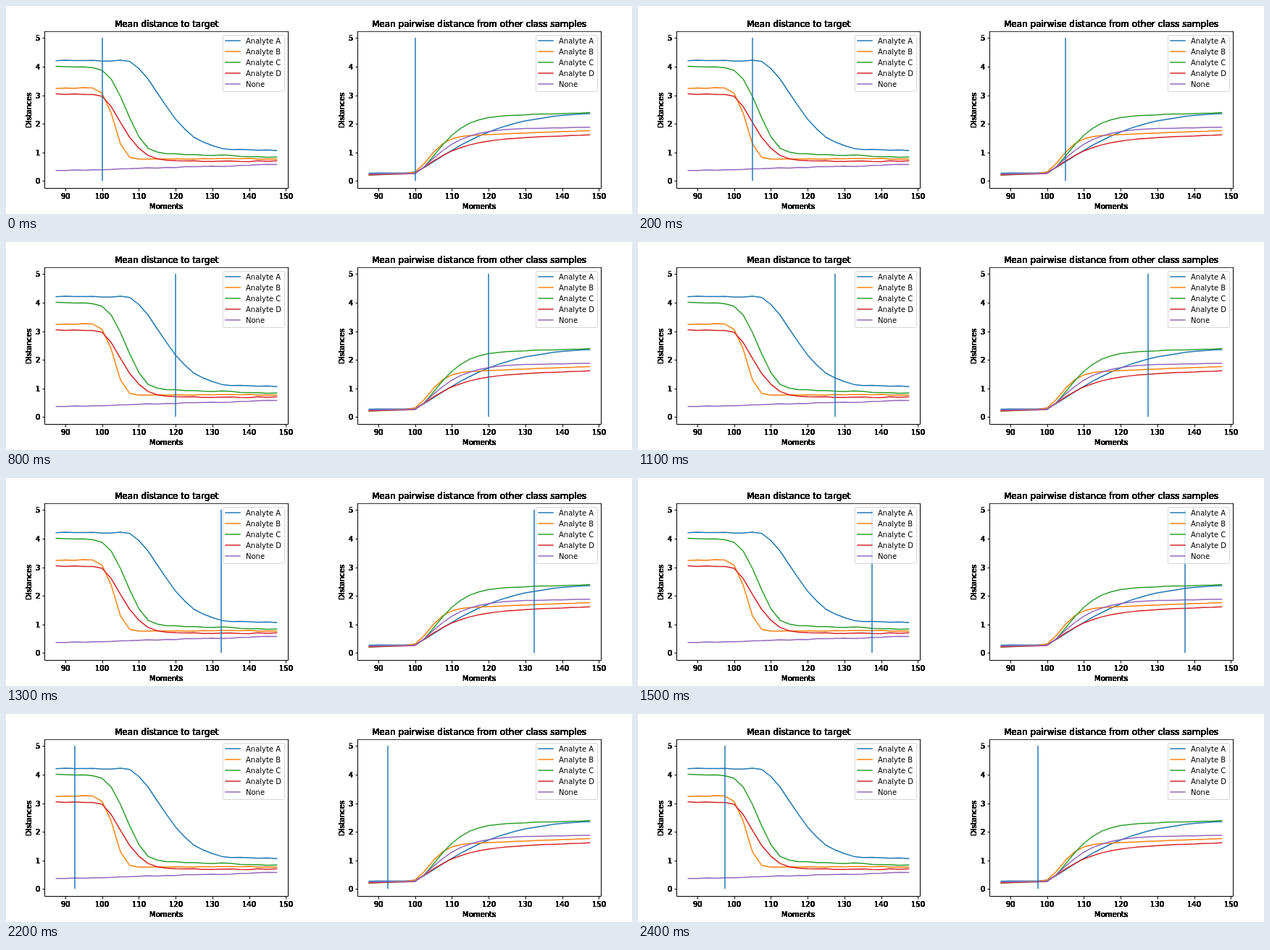
Animation, 864 px wide and 288 px high, one loop 2500 ms. Source, as an HTML page with a canvas:

```html
<!DOCTYPE html>
<html lang="en">
<head>
<meta charset="utf-8">
<title>Distances</title>
<style>
  html, body { margin: 0; width: 100%; height: 100%; overflow: hidden; background: #fff; }
  canvas { display: block; }
</style>
</head>
<body>
<canvas id="stage" width="864" height="288"></canvas>
<script>
const ctx = document.getElementById('stage').getContext('2d');
const COLORS = ['#1f77b4', '#ff7f0e', '#2ca02c', '#d62728', '#9467bd'];
const NAMES = ['Analyte A', 'Analyte B', 'Analyte C', 'Analyte D', 'None'];
const FIRST = 87.5, STEP = 2.5, COUNT = 25, START = 5, FRAME_MS = 100;
const LEFT = 54, RIGHT = 388.8, MIDDLE = (LEFT + RIGHT) / 2;

// Each curve: from, to, onset, scale, shape, drift per moment.
const PANELS = [
  {
    title: 'Mean distance to target', offset: 0, jitter: .015,
    curves: [
      [4.21, 1.07, 106, 13.7, 1.97, 0],
      [3.25, .775, 95, 9.03, 4.4, 0],
      [3.99, 1.04, 95, 13, 3.45, -.004],
      [3.04, .69, 98, 9.4, 2.1, 0],
      [.35, .35, 87.5, 1, 1, .0037]
    ]
  },
  {
    title: 'Mean pairwise distance from other class samples', offset: 432, jitter: .005,
    curves: [
      [.27, 2.43, 99, 19.5, 1.35, 0],
      [.27, 1.52, 99, 6.7, 1.85, .005],
      [.26, 2.2, 100, 9.4, 1.6, .004],
      [.26, 1.42, 100, 9.8, 1.2, .004],
      [.26, 1.8, 100, 9.6, 1.35, .0015]
    ]
  }
];

const px = v => LEFT + (v - 84.5) * (RIGHT - LEFT) / 66;
const py = v => 242.12 - v * 39.535;

function curveValue([from, to, onset, scale, shape, drift], moment) {
  const rise = Math.max(0, (moment - onset) / scale) ** shape;
  return to + (from - to) * Math.exp(-rise) + drift * (moment - onset);
}

function curvePoints(curve, seed, jitter) {
  return Array.from({ length: COUNT }, (_, k) => {
    const moment = FIRST + k * STEP;
    const wobble = jitter * Math.sin(k * k * 1.7 + seed * 5);
    return [px(moment), py(curveValue(curve, moment) + wobble)];
  });
}

function line(points, color, width, cap = 'butt') {
  ctx.beginPath();
  points.forEach(([x, y]) => ctx.lineTo(x, y));
  ctx.strokeStyle = color;
  ctx.lineWidth = width;
  ctx.lineCap = cap;
  ctx.lineJoin = 'round';
  ctx.stroke();
}

// Repeated passes harden the antialiased edges of the text.
function text(str, x, y, align = 0, size = 10, passes = 25) {
  ctx.font = `${size}px "DejaVu Sans", sans-serif`;
  ctx.fillStyle = '#000';
  const left = Math.round(x - ctx.measureText(str).width * align);
  for (let i = 0; i < passes; i++) ctx.fillText(str, left, y);
}

function axes(title) {
  line([[54, 35.5], [389, 35.5]], '#333', 1);
  line([[53.5, 35], [53.5, 252.5], [389.5, 252.5], [389.5, 35]], '#000', 1);
  for (let v = 90; v <= 150; v += 10) {
    const x = Math.round(px(v)) + .5;
    line([[x, 253], [x, 256.5]], '#000', 1);
    text(String(v), px(v), 267, .5);
  }
  for (let v = 0; v <= 5; v++) {
    const y = Math.round(py(v));
    line([[50.5, y + .5], [54, y + .5]], '#000', 1);
    text(String(v), 47, y + 4, 1);
  }
  text(title, MIDDLE, 29, .5, 12);
  text('Moments', MIDDLE, 281, .5);
  ctx.save();
  ctx.translate(35, 145);
  ctx.rotate(-Math.PI / 2);
  text('Distances', 0, 0, .5);
  ctx.restore();
}

function legend() {
  ctx.beginPath();
  ctx.roundRect(299.5, 40.5, 85, 78, 2);
  ctx.fillStyle = 'rgba(255,255,255,.8)';
  ctx.fill();
  ctx.strokeStyle = 'rgba(204,204,204,.8)';
  ctx.lineWidth = 1;
  ctx.stroke();
  NAMES.forEach((name, i) => {
    const y = 48 + i * 15;
    line([[303, y], [323, y]], COLORS[i], 1.5, 'square');
    text(name, 331, y + 4, 0, 10, 1);
  });
}

function panel({ title, offset, jitter, curves }, moment) {
  ctx.save();
  ctx.translate(offset, 0);
  curves.forEach((curve, i) =>
    line(curvePoints(curve, i, jitter), COLORS[i], 1.5, 'square'));
  const x = Math.round(px(moment));
  line([[x, 44], [x, 242]], COLORS[0], 1.5);
  axes(title);
  legend();
  ctx.restore();
}

let shown = -1;
const begin = performance.now();

function draw() {
  const step = Math.floor((performance.now() - begin) / FRAME_MS) % COUNT;
  if (step !== shown) {
    shown = step;
    const moment = FIRST + (step + START) % COUNT * STEP;
    ctx.fillStyle = '#fff';
    ctx.fillRect(0, 0, 864, 288);
    PANELS.forEach(p => panel(p, moment));
  }
  requestAnimationFrame(draw);
}
draw();
</script>
</body>
</html>
```
